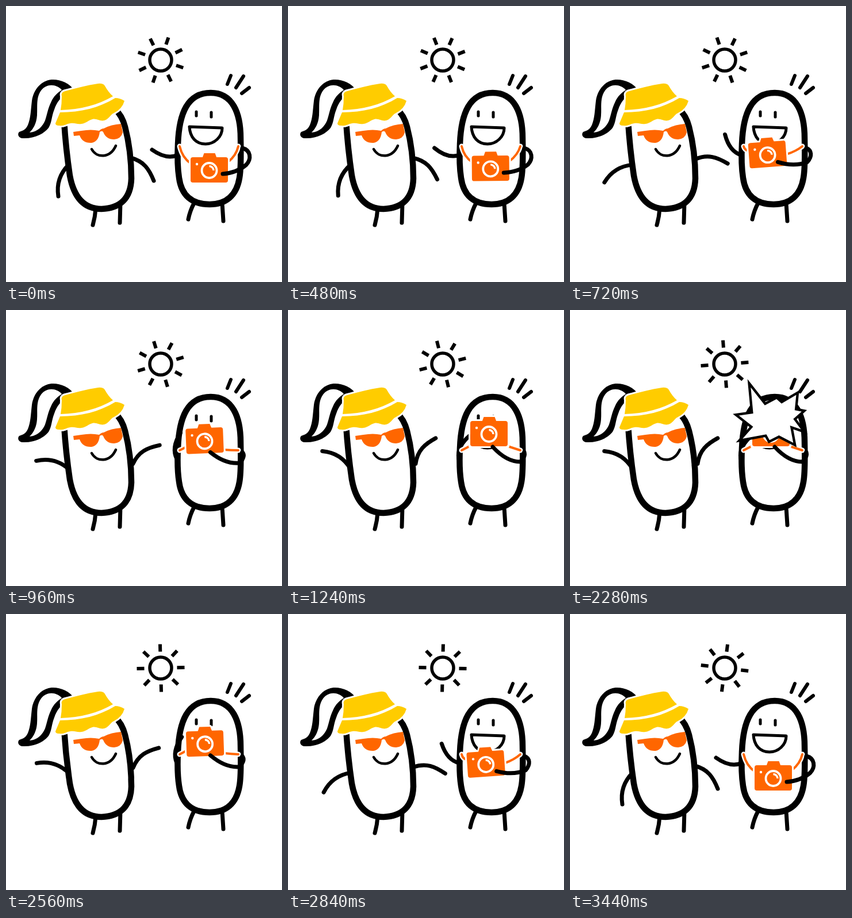
Recreate the animation shown at these times as an HTML page. Size 480 by 480 pixels, loop 3480 ms.

```html
<!DOCTYPE html>
<html lang="en">
<head>
<meta charset="utf-8">
<title>Holiday snapshot</title>
<style>
  html, body { margin: 0; width: 100%; height: 100%; overflow: hidden; background: #fff; }
  svg { display: block; width: 100%; height: 100%; }
  .line { fill: none; stroke: #000; stroke-linecap: round; stroke-linejoin: round; }
  .limb { stroke-width: 7; }
  .body { fill: #fff; stroke: #000; stroke-width: 10.5; }
  .yellow { fill: #fc0; }
  .orange { fill: #f60; }
  .halo { fill: #fff; stroke: #fff; stroke-width: 6; stroke-linejoin: round; }
  .strap { fill: none; stroke-linecap: round; }
</style>
</head>
<body>
<svg viewBox="0 0 480 480">
  <circle cx="269" cy="94" r="19" fill="#fff" stroke="#000" stroke-width="5.5"/>
  <path id="rays" stroke="#000" stroke-width="6"/>
  <path class="line" stroke-width="6" d="M391 121L385 136M413 122L400 142M423 142L410 152"/>

  <!-- friend with the hat -->
  <path d="M120 148C110 133 93 127 79 128C61 130 48 145 45 165C43 182 43 195 38 207C34 216 28 217 23 219C19 223 22 230 29 230C50 231 66 222 74 212C80 202 79 192 84 180C88 168 95 158 106 154Z"/>
  <path fill="#fff" d="M97 146C88 136 71 134 61 147C52 159 55 175 54 190C53 205 47 214 41 220C55 219 64 209 68 199C72 187 73 178 78 168C83 156 90 151 97 146Z"/>
  <path class="line limb" d="M156 352Q155 367 151 381M199 342L198 377"/>
  <path id="armA" class="line limb" d="M109 276C92 293 88 312 91 331"/>
  <path id="armB" class="line limb" d="M217 264C240 270 249 284 257 304"/>
  <path class="body" d="M101 200C103 232 107 268 111 295C118 333 136 353 166 353C198 352 217 335 218 300C218 270 214 237 207 210C203 195 197 186 190 180L115 181Z"/>
  <g id="hat">
    <path id="crown" class="yellow" d="M97 157Q95 150 103 148C122 143 140 138 160 135Q169 134 172 139Q178 150 186 157C160 172 130 180 95 181Q97 170 97 157Z"/>
    <path id="brim" class="yellow" d="M94 185C130 185 162 177 190 160Q198 160 206 165Q202 179 188 186C181 189 179 197 171 199C163 201 158 195 150 197C142 199 140 204 131 205C123 206 121 203 112 204C104 205 102 209 92 208Q86 208 86 204Z"/>
  </g>
  <path class="orange" d="M117 219L131 217Q148 214 162 217Q166 213 170 213Q183 206 200 205L203 220Q200 231 188 232Q174 232 169 219Q167 216 163 219Q161 236 149 238Q133 239 128 225L118 226Z"/>
  <path class="line" stroke-width="4.5" d="M149 249C158 265 181 265 191 243"/>

  <!-- friend with the camera -->
  <path class="line limb" d="M327 343Q320 356 317 371M376 343L378 374"/>
  <path class="body" d="M299 240C301 186 316 151 356 151C394 151 408 186 408 230C409 275 408 288 406 299C401 329 383 345 354 345C323 345 305 329 301 299C298 280 298 260 299 240Z"/>
  <path class="line" stroke-width="5" d="M331 184V191M357 185V193"/>
  <path class="line" stroke-width="5" d="M319 210L376 212C376 228 362 240 347 240C330 240 320 228 319 210Z"/>
  <path id="armC" class="line limb" d="M299 259C283 266 268 260 254 250"/>
  <path id="strapHalo" class="strap" stroke="#fff" stroke-width="9"/>
  <path id="strap" class="strap" stroke="#f60" stroke-width="4"/>
  <g id="camera">
    <path class="halo" d="M-32.5 -22H32.5V22H-32.5ZM-11 -22L-9 -29H10L12 -22Z"/>
    <rect class="orange" x="-32.5" y="-22" width="65" height="44" rx="4"/>
    <path class="orange" d="M-12 -21L-9 -29H10L13 -21Z"/>
    <circle cx="-21.5" cy="-10" r="2.2" fill="#fff"/>
    <circle cy="1" r="13" fill="none" stroke="#fff" stroke-width="3.8"/>
    <path d="M0 -6.5A7.5 7.5 0 0 1 7.5 1" fill="none" stroke="#fff" stroke-width="3.4"/>
  </g>
  <path id="armD" class="line limb"/>
  <path id="flash" fill="#fff" stroke="#000" stroke-width="4.5" stroke-miterlimit="10" d="M303 123L332 160L353 149L362 157L391 140L388 170L403 173L386 188L403 211L380 203L386 235L357 220L339 229L333 218L285 227L307 202L279 180L308 176Z"/>
</svg>
<script>
const LOOP = 3480, STEP = 40;
const $ = id => document.getElementById(id);
const set = (id, name, value) => $(id).setAttribute(name, value);
const mix = (a, b, k) => a + (b - a) * k;
const ramp = (t, from, to) => Math.min(1, Math.max(0, (t - from) / (to - from)));
const ease = u => (1 - Math.cos(Math.PI * u)) / 2;

function drawCamera(p) {
  const bow = Math.sin(Math.PI * p);
  const x = mix(353.5, 349.5, p) - 9 * bow, y = mix(285, 215, p);
  set("camera", "transform", `translate(${x} ${y}) rotate(${-4.5 * bow})`);

  const lx = x - 32, ly = y + mix(-11, 21, p * p);
  const rx = x + 33, ry = y + mix(-14, 22, p);
  const sag = 5 * (1 - p);
  const d = `M302 244Q${(302 + lx) / 2 - sag} ${(244 + ly) / 2 + sag} ${lx} ${ly}` +
    `M404 244Q${(404 + rx) / 2 + sag} ${(244 + ry) / 2 + sag / 2} ${rx} ${ry}`;
  set("strapHalo", "d", d);
  set("strap", "d", d);

  // shoulder, elbow, then the hand that holds the camera
  const ex = mix(418, 404, p), ey = mix(276, 264, p);
  set("armD", "d", `M411 247C${ex + 8} 251 ${ex + 9} ${ey - 10} ${ex} ${ey}` +
    `Q${mix(402, 380, p) - 4 * bow} ${mix(290, 264, p)} ${mix(377, 356, p) - 8 * bow} ${mix(292, 238, p)}`);
}

function drawFlash(t) {
  const pop = ease(ramp(t, 1660, 1800)) * (1 - ramp(t, 2290, 2380));
  const drift = ramp(t, 1880, 2280);
  const size = pop * mix(1, 0.96, drift);
  set("flash", "transform", `translate(${341 + 7 * drift} 232) scale(${size}) translate(-341 -232)`);
  set("flash", "visibility", pop > 0 ? "visible" : "hidden");
}

function draw(t) {
  const p = ease(ramp(t, 380, 1180)) * (1 - ease(ramp(t, 2360, 3160)));
  set("rays", "transform", `rotate(${19 + t * 0.0096} 269 94)`);
  set("armA", "transform", `rotate(${104 * p} 108.8 276)`);
  set("armB", "transform", `rotate(${-97 * p} 221 263.5)`);
  set("armC", "transform", `rotate(${105 * p} 298 258)`);
  drawCamera(p);
  drawFlash(t);
}

// white rim behind both parts of the hat
for (const id of ["brim", "crown"]) {
  const rim = $(id).cloneNode();
  rim.removeAttribute("id");
  rim.setAttribute("class", "halo");
  $("hat").prepend(rim);
}

set("rays", "d", Array.from({ length: 8 }, (_, i) => {
  const a = i * Math.PI / 4, x = Math.sin(a), y = -Math.cos(a);
  return `M${269 + x * 28.5} ${94 + y * 28.5}L${269 + x * 41.5} ${94 + y * 41.5}`;
}).join(""));

const start = performance.now();
function tick() {
  const t = (performance.now() - start) % LOOP;
  draw(Math.floor(t / STEP) * STEP);
  requestAnimationFrame(tick);
}
tick();
</script>
</body>
</html>
```
